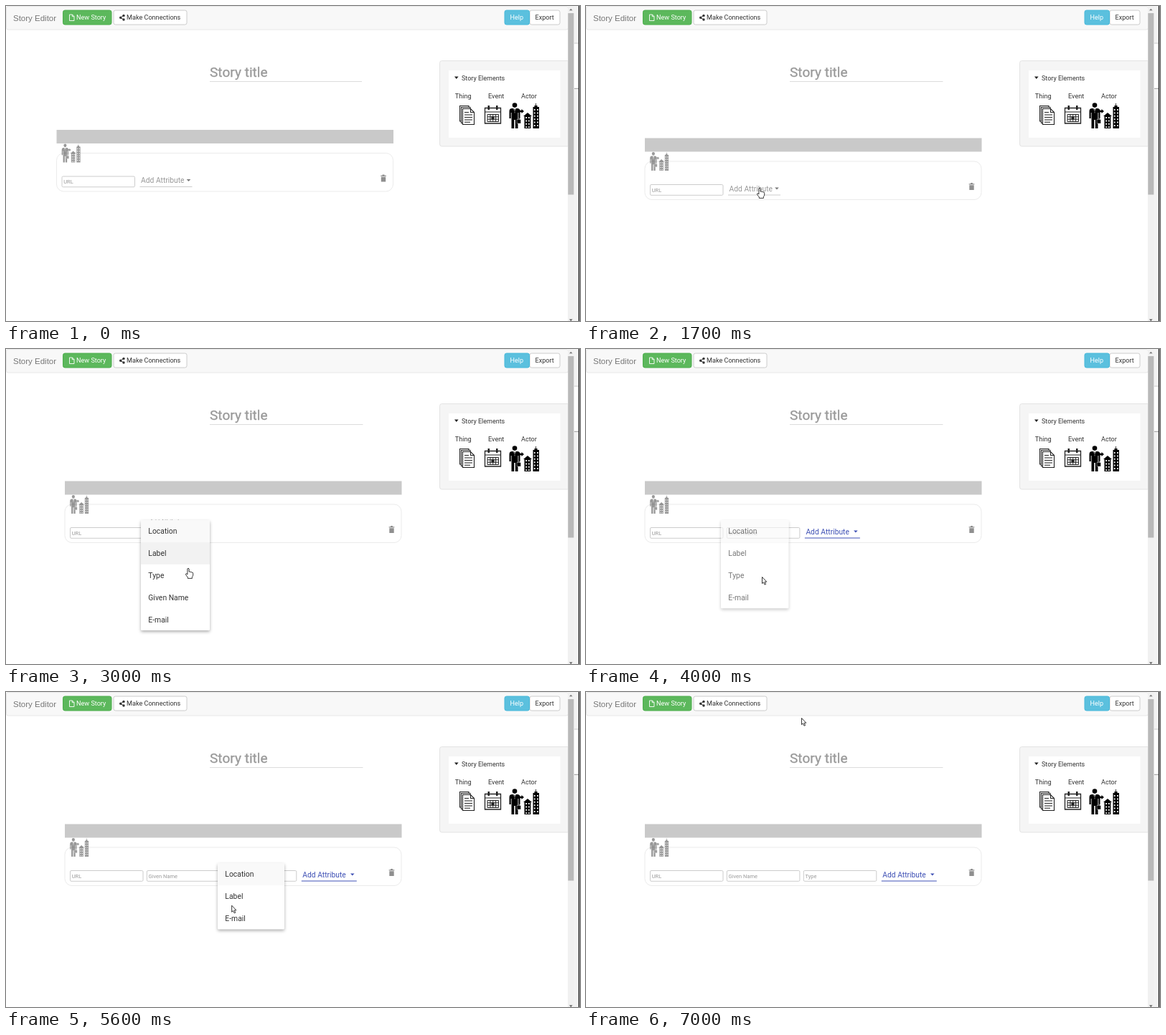
Recreate the animation shown at these times as an HTML page. Size 800x440 px, loop 7.1 s.

```html
<!DOCTYPE html>
<html lang="en">
<head>
<meta charset="utf-8">
<title>Story Editor</title>
<style>
  html, body { margin: 0; width: 100%; height: 100%; overflow: hidden; background: #fff; }
  svg { display: block; width: 800px; height: 440px; }
  text { font-family: Roboto, "Liberation Sans", sans-serif; font-size: 9.1px; fill: #333; }
  .brand { font-family: "Liberation Sans", Arial, sans-serif; font-size: 11.5px; fill: #777; }
  .title { font-size: 19.1px; fill: #999; stroke: #999; stroke-width: .3px; }
  .light { fill: #fff; }
  .field text { font-size: 7.5px; fill: #999; }
  .field rect { fill: #fff; stroke: #ccc; }
  #select text { font-size: 10.3px; fill: inherit; }
  #select .float { font-size: 7.7px; fill: #999; }
  #menu text { font-size: 10.4px; }
  #panel { filter: drop-shadow(0 2px 2px rgba(0, 0, 0, .32)); }
</style>
</head>
<body>
<svg viewBox="0 0 800 440">
  <defs>
    <g id="actor">
      <circle cx="7.5" cy="3.6" r="3.3"/>
      <path d="M0 12Q0 8 4 8H11Q15 8 15 12V22H12.8V14H12V36H8.3V24H6.7V36H3V14H2.2V22H0Z"/>
      <path d="M5.8 8L7.5 15L9.2 8Z" fill="#fff"/>
      <path d="M7.1 8.6H7.9L8.3 12.5L7.5 14L6.7 12.5Z"/>
      <path d="M10.5 23.5H16V29H10.5ZM12 23.5V22H14.5V23.5" stroke="#fff" stroke-width=".4"/>
      <path d="M14.5 10.8H17V9L20.5 12L17 15V13.2H14.5Z"/>
      <path d="M19.5 19L25.5 14L31.5 19H29.8V36H21V19Z"/>
      <path d="M33 6H41.5V36H33ZM36.6 1H37.4V6H36.6ZM35 4H39V6H35Z"/>
      <path d="M23.6 20V35M27.4 20V35M35.2 9V34M39.4 9V34" stroke="#fff" stroke-width="1.7" stroke-dasharray="2 2.4"/>
    </g>
  </defs>

  <rect width="800" height="440" fill="#fff"/>

  <!-- navigation bar -->
  <rect x=".5" y=".5" width="783" height="32.5" rx="2.5" fill="#f8f8f8" stroke="#e7e7e7"/>
  <text class="brand" x="10" y="20.6">Story Editor</text>
  <rect x="79.5" y="6" width="67.5" height="20" rx="2.6" fill="#5cb85c" stroke="#4cae4c"/>
  <path d="M88.5 12H92.5L95 14.5V20.5H88.5ZM92.3 12V14.7H95" fill="none" stroke="#fff" stroke-width=".9"/>
  <text class="light" x="98" y="19.4">New Story</text>
  <rect x="150" y="6" width="102" height="20" rx="2.6" fill="#fff" stroke="#ccc"/>
  <path d="M164 13.2L159.5 16.2L164 19.2" fill="none" stroke="#333"/>
  <g fill="#333"><circle cx="159.7" cy="16.2" r="1.7"/><circle cx="164" cy="13.4" r="1.7"/><circle cx="164" cy="19" r="1.7"/></g>
  <text x="168" y="19.4">Make Connections</text>
  <rect x="730" y="6" width="42" height="20" rx="2.6" fill="#fff" stroke="#ccc"/>
  <rect x="695" y="6" width="34.5" height="20" rx="2.6" fill="#5bc0de" stroke="#46b8da"/>
  <text class="light" x="702.5" y="19.4">Help</text>
  <text x="737.5" y="19.4">Export</text>

  <text class="title" x="284" y="98.7">Story title</text>
  <path id="rule" d="M284 105.5H497" stroke="#dcdcdc"/>

  <!-- element palette -->
  <rect x="604.5" y="76.5" width="181" height="119.5" rx="3" fill="#f5f5f5" stroke="#e3e3e3"/>
  <rect x="617" y="90" width="155.5" height="94" fill="#fff"/>
  <path d="M625 98.6H630.6L627.8 102Z" fill="#222"/>
  <text x="635" y="103.6" style="font-size:9px">Story Elements</text>
  <text x="625.8" y="128.6">Thing</text>
  <text x="672" y="128.6">Event</text>
  <text x="718" y="128.6">Actor</text>
  <g fill="#fff" stroke="#222" stroke-width="1.1">
    <path d="M632.5 139.5H645V161H632.5Z"/>
    <path d="M634.5 141.5H647V163.5H634.5Z"/>
    <path d="M636.5 143.5H647.5L652.5 148.5V165.5H636.5ZM647.5 143.5V148.5H652.5"/>
    <path d="M639 148.5H645M639 152H650M639 155.5H650M639 159H650M639 162.3H647"/>
  </g>
  <path d="M667.5 142.5H689.5V164H667.5Z" fill="#fff" stroke="#222" stroke-width="1.3"/>
  <path d="M668 148H689M671 151.5H686.5V161.5H671ZM671 154.8H686.5M671 158.2H686.5M674.9 151.5V161.5M678.7 151.5V161.5M682.6 151.5V161.5" fill="none" stroke="#222"/>
  <path d="M676.5 154.5H680.5V158.5H676.5ZM671.5 139H674V145H671.5ZM683 139H685.5V145H683Z" fill="#222"/>
  <use href="#actor" x="701.5" y="135"/>

  <!-- story card -->
  <g id="card">
    <rect x="82" y="184.5" width="469.5" height="19" fill="#c9c9c9"/>
    <rect x="82" y="217" width="469" height="53.5" rx="10" fill="#fff" stroke="#ebebeb"/>
    <g opacity=".4"><use href="#actor" transform="translate(89.2 203.7) scale(.625 .73)"/></g>
    <path d="M533.7 248.2H536V247H539V248.2H541.3V249.6H533.7ZM534.3 250.3H540.7V257H534.3Z" fill="#8f8f8f"/>
    <g class="field" id="fields"></g>
    <g id="select">
      <text class="label" x="1.5" y="258.8">Add Attribute</text>
      <text class="float" x="2.5" y="242.5">Add Attribute</text>
      <path class="arrow" d="M-2.8 253.4H2.8L0 256.4Z"/>
      <path class="line" fill="none"/>
    </g>
  </g>

  <g id="menu">
    <rect id="panel" y="239" rx="1.5" fill="#fff"/>
    <rect id="first" y="239" height="31" rx="1.5" fill="#f9f9f9"/>
    <rect id="hover" height="31" fill="#f2f2f2"/>
    <g id="items"></g>
  </g>

  <!-- window edge -->
  <rect x="783" width="9" height="440" fill="#f1f1f1"/>
  <rect x="783.3" y="10" width="8" height="253.5" fill="#b9b9b9"/>
  <path d="M785 6.3L787.3 3.7L789.6 6.3Z" fill="#777"/>
  <path d="M785 437.5H789.6L787.3 440Z" fill="#555"/>
  <rect x="792" width="6" height="440" fill="#f3f3f3"/>
  <rect x="792" y="52" width="6" height="63" fill="#fff"/>
  <path d="M792 52H798" stroke="#ccc"/>
  <path d="M792 115.3H798" stroke="#999"/>
  <path d="M798.6 0V440" stroke="#222" stroke-width="1.6"/>

  <g id="cursor" stroke="#222" stroke-width=".9" stroke-linejoin="round" fill="#fff">
    <path id="arrow" d="M.5 .5V9.6L2.5 7.8L4 11.2L5.6 10.5L4.1 7.2H6.8Z"/>
    <path id="hand" d="M-1.1 1Q0 -.6 1.1 1V5.2Q2.1 4.4 3.1 5.6Q4.3 4.9 5 6.1Q6.7 5.7 6.7 7.4V10.2L5.4 12.6V14.4H-.7V12.9L-3.4 9.4Q-3.8 7.4 -2.2 7.8L-1.1 9Z"/>
  </g>
</svg>

<script>
const LOOP = 7100, STEP = 100, ROW = 30.8, PITCH = 106.9;
const $ = id => document.getElementById(id);
const set = (el, attrs) => { for (const k in attrs) el.setAttribute(k, attrs[k]); };
const show = (el, on) => set(el, { visibility: on ? "visible" : "hidden" });
const ramp = (t, a, b) => Math.min(1, Math.max(0, (t - a) / (b - a)));

// time, x, y of the pointer tip
const path = [
  [1600, 640, 395], [1700, 242, 254], [2000, 242, 254], [2500, 244, 276],
  [3000, 254, 306], [3200, 253, 312], [3500, 250, 341], [3700, 250, 341],
  [4000, 245, 318], [4400, 340, 253], [4600, 340, 253], [4900, 337, 280],
  [5200, 336, 313], [5500, 336, 313], [6100, 205, 221], [6200, 217, 210],
  [6500, 225, 150], [7000, 300, 36]
];

const menus = [
  { open: 2100, full: 2500, pick: 3700, fade: 3900, gone: 4100, x: 188, width: 96,
    items: ["Location", "Label", "Type", "Given Name", "E-mail"], chosen: "Given Name",
    hover: [[2300, 0], [2600, 1], [3100, 2], [3400, 3]] },
  { open: 4600, full: 5000, pick: 5500, fade: 5700, gone: 5900, x: 295, width: 94.5,
    items: ["Location", "Label", "Type", "E-mail"], chosen: "Type",
    hover: [[4700, 0], [4900, 1], [5100, 2]] }
];

function pointerAt(t) {
  let i = path.findIndex(p => p[0] > t);
  if (i < 0) return path[path.length - 1].slice(1);
  const [a, ax, ay] = path[i - 1], [b, bx, by] = path[i], k = ramp(t, a, b);
  return [ax + (bx - ax) * k, ay + (by - ay) * k];
}

function drawFields(count) {
  $("fields").innerHTML = ["URL", "Given Name", "Type"].slice(0, count).map((name, i) => {
    const x = 89.5 + i * PITCH;
    return `<rect x="${x}" y="249.5" width="101.5" height="14.8" rx="1.5"/>
            <text x="${x + 2.2}" y="259.6">${name}</text>`;
  }).join("");
}

function drawSelect(count, focused, open) {
  const select = $("select"), part = name => select.querySelector("." + name);
  const color = focused ? "#3f51b5" : "#999";
  set(select, { transform: `translate(${198 + (count - 1) * PITCH} 0)`, fill: color });
  show(part("label"), !open);
  show(part("float"), open);
  set(part("arrow"), { transform: `translate(${focused ? 71 : 68} 0)`, fill: focused ? color : "#777" });
  set(part("line"), { d: `M0 264H${focused ? 77 : 73}`, stroke: focused ? color : "#ccc" });
}

function drawMenu(menu, t) {
  show($("menu"), !!menu);
  if (!menu) return;
  const picked = t >= menu.pick;
  const items = menu.items.filter(name => !picked || name !== menu.chosen);
  const width = picked ? menu.width - 1.5 : menu.width;
  const row = menu.hover.filter(h => h[0] <= t).pop();
  set($("menu"), {
    transform: `translate(${menu.x} 0)`,
    opacity: Math.pow(ramp(t, menu.open, menu.full), .6) * (1 - .7 * ramp(t, menu.fade, menu.gone))
  });
  set($("panel"), { width, height: items.length * ROW });
  set($("first"), { width });
  set($("hover"), { width, y: 239 + ROW * (row ? row[1] : 0), opacity: row && row[1] && !picked ? 1 : 0 });
  $("items").innerHTML = items.map((name, i) =>
    `<text x="10.3" y="${258.4 + i * ROW}">${name}</text>`).join("");
}

function draw(t) {
  const settled = t >= 1100;
  const count = 1 + menus.filter(m => t >= m.pick).length;
  const menu = menus.find(m => t > m.open && t < m.gone);
  set($("card"), { transform: settled ? "" : "translate(-11.5 -11.5)" });
  set($("rule"), { d: `M284 105.5H${settled ? 497.5 : 496}` });
  drawFields(count);
  drawSelect(count, count > 1, !!menu && t < menu.pick);
  drawMenu(menu, t);

  const visible = t >= path[0][0];
  const hand = (t >= 1700 && t <= 3700) || (t >= 4300 && t < 5500);
  show($("arrow"), visible && !hand);
  show($("hand"), visible && hand);
  if (visible) set($("cursor"), { transform: `translate(${pointerAt(t)})` });
}

const start = performance.now();
let last = -1;
function tick() {
  const t = Math.floor((performance.now() - start) % LOOP / STEP) * STEP;
  if (t !== last) draw(last = t);
  requestAnimationFrame(tick);
}
tick();
</script>
</body>
</html>
```
